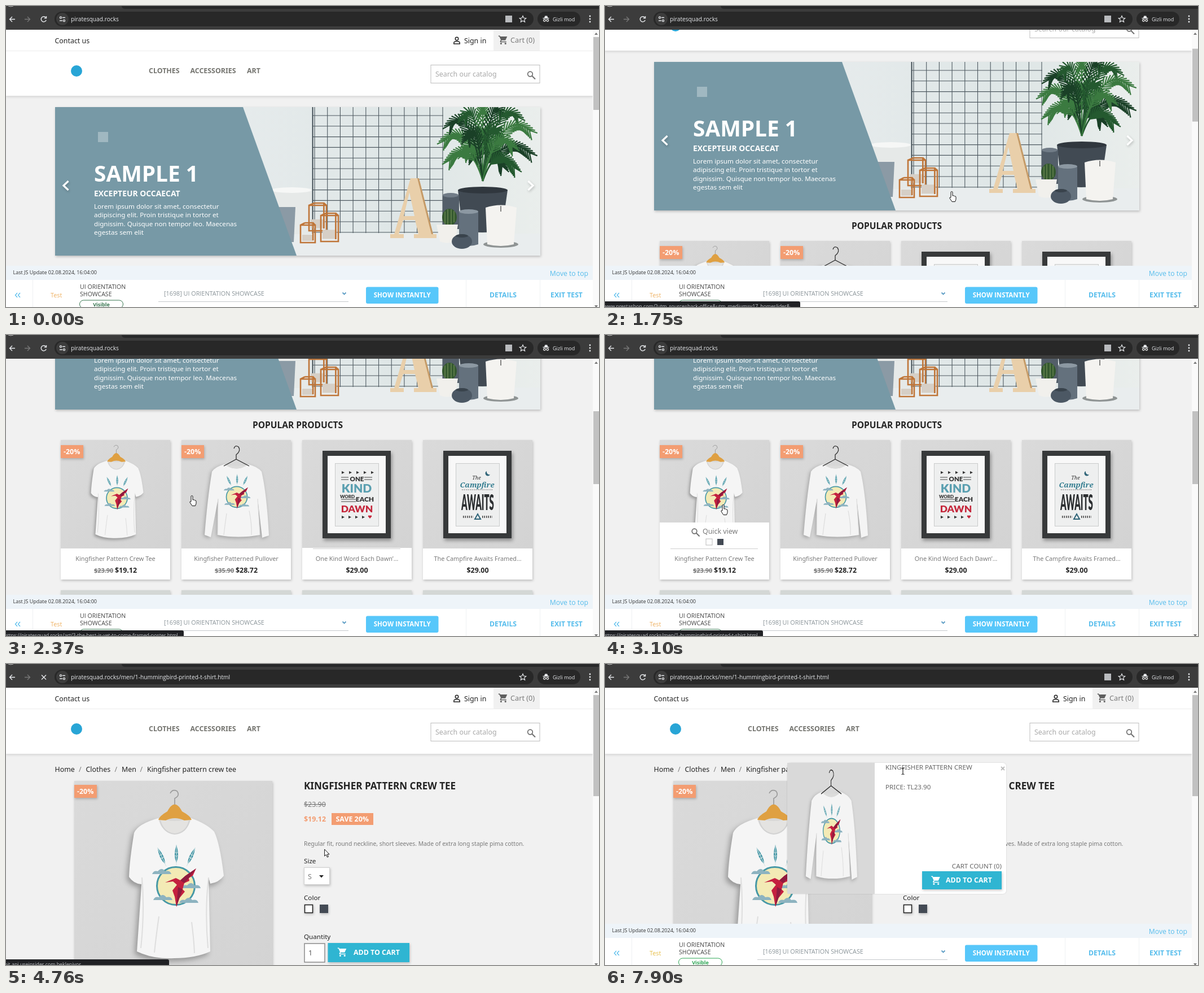
Animation of 1051 by 533 pixels, one loop 8 s. Source, as an HTML page:

```html
<!DOCTYPE html>
<html>
<head>
<meta charset="utf-8">
<style>
html, body { margin: 0; width: 100%; height: 100%; overflow: hidden; background: #f1f1f1 }
svg { display: block; width: 1051px; height: 533px; font-family: "Noto Sans", sans-serif; white-space: pre }
.card { filter: drop-shadow(1px 2px 2px rgba(0,0,0,.22)) }
.open { font-family: "Open Sans", sans-serif }
.arial { font-family: "Liberation Sans", Arial, sans-serif }
</style>
</head>
<body>
<svg id="stage" viewBox="0 0 1051 533"></svg>
<script>
const LOOP = 8000, STEP = 70, BASE = 12.4, SMALL = 11.64, TINY = 10.87;
const BLUE = '#57bdec', ORANGE = '#f39d72', GRAY = '#7a7a7a', INK = '#232323', CYAN = '#2fb5d2';

const T = (x, y, s, size = BASE, fill = INK, more = '') =>
  `<text x="${x}" y="${y}" font-size="${size}" fill="${fill}" ${more}>${s}</text>`;
const R = (x, y, w, h, fill, more = '') =>
  `<rect x="${x}" y="${y}" width="${w}" height="${h}" fill="${fill}" ${more}/>`;
const C = (x, y, r, fill, more = '') => `<circle cx="${x}" cy="${y}" r="${r}" fill="${fill}" ${more}/>`;
const E = (x, y, rx, ry, fill) => `<ellipse cx="${x}" cy="${y}" rx="${rx}" ry="${ry}" fill="${fill}"/>`;
const P = (d, fill, more = '') => `<path d="${d}" fill="${fill}" ${more}/>`;
const L = (d, stroke, w = 1, more = '') => P(d, 'none', `stroke="${stroke}" stroke-width="${w}" ${more}`);
const G = (content, more) => `<g ${more}>${content}</g>`;
const at = (x, y, sx = 1, sy = sx) => `transform="translate(${x} ${y}) scale(${sx} ${sy})"`;
const BOLD = 'font-weight="700"', MID = 'text-anchor="middle"', STRIKE = 'text-decoration="line-through"';
const times = (n, f) => Array.from({ length: n }, (_, i) => f(i)).join('');

const cart = (x, y, fill) => G(
  P('M1 2h3.2l1 2H21l-4 8.5H8.2L7 15h12v2H5.5L4.5 15l2-3.5L3 4H1z', fill) + C(7, 20, 2, fill) + C(17, 20, 2, fill), at(x, y, .776));
const lens = (x, y, c) => C(x, y, 4.3, 'none', `stroke="${c}" stroke-width="1.7"`) + L(`M${x + 3} ${y + 3}l6 6`, c, 2);

function browser() {
  const white = '#e8eaed';
  return R(0, 0, 1051, 42, '#3c3c3c') + P('M205 0H1051V5H212Q205 5 205 0Z', '#272829') + L('M4 0q4 2 9 0', '#c8c8c8')
    + L('M16 23.500H7m4-4.500-4.500 4.500 4.500 4.500', white, 1.4) + L('M33 23.500h9m-4-4.500 4.500 4.500-4.500 4.500', '#777', 1.4)
    + G(L('M70.500 20.500a4.600 4.600 0 1 0 .7 4.500M71.500 18v3.600h-3.600', white, 1.4), 'id="reload"')
    + G(L('M63 19.500l8 8m0-8-8 8', white, 1.4), 'id="stop"')
    + R(86, 10, 849, 26, '#282828', 'rx="13"') + C(100, 23, 11, '#3c3c3c')
    + L('M100 20.500h5M95 26h5', white, 1.4) + C(97, 20.5, 1.6, 'none', `stroke="${white}" stroke-width="1.2"`)
    + C(103, 26, 1.6, 'none', `stroke="${white}" stroke-width="1.2"`)
    + T(115, 27, '', 10.2, white, 'id="url" class="open"')
    + R(885, 17, 12, 12, '#b9bbbe', 'id="translate"')
    + L('M916 17.500l1.700 3.800 4 .4-3 2.700.9 4-3.600-2.100-3.600 2.100.9-4-3-2.700 4-.4z', white, 1.2)
    + R(942, 10, 76, 26, '#282828', 'rx="13"') + P('M954 21l1.200-3.500h4L960.500 21h2v1.200h-11V21z', white)
    + C(954.4, 25.5, 1.9, 'none', 'stroke="#fff" stroke-width="1.1"') + C(959.8, 25.5, 1.9, 'none', 'stroke="#fff" stroke-width="1.1"')
    + T(969, 26.5, 'Gizli mod', 9, white, 'class="open"')
    + [18, 23, 28].map(y => C(1035, y, 1.4, white)).join('');
}

function header() {
  return R(0, 42, 1040, 117, '#fff', 'style="filter:drop-shadow(0 2px 2px rgba(0,0,0,.12))"') + R(0, 79, 1040, 1, '#ececec')
    + T(86.5, 66, 'Contact us') + T(812, 66, 'Sign in') + R(864, 42, 82, 37, '#f1f1f1')
    + C(799, 58, 2.7, 'none', `stroke="${INK}" stroke-width="1.5"`) + L('M793.800 67v-1.500q0-3 5.200-3t5.200 3V67z', INK, 1.5)
    + cart(872, 51, '#5f5f5f') + T(894, 65, 'Cart (0)', 12.7, GRAY)
    + C(125, 115, 10, '#28a5d6')
    + [[253, 'CLOTHES'], [326.5, 'ACCESSORIES'], [427, 'ART']].map(([x, s]) => T(x, 118.5, s, BASE, '#74746f', BOLD)).join('')
    + R(753, 104.5, 193, 32, '#fff', 'stroke="#bdbdbd"') + T(761, 125, 'Search our catalog', BASE, '#a9a9a9') + lens(929, 120.5, '#6f6f6f');
}

// Palm fronds arch out of the pot and droop, with thin leaflets on both sides of the stem.
function frond([x, y], i) {
  const bx = 845, by = 310, cx = bx + (x - bx) * .4, cy = y - 45;
  let d = `M${bx} ${by}Q${cx} ${cy} ${x} ${y}`;
  for (let t = .3; t <= 1; t += .045) {
    const u = 1 - t, px = u * u * bx + 2 * u * t * cx + t * t * x, py = u * u * by + 2 * u * t * cy + t * t * y;
    const dir = Math.atan2(u * (cy - by) + t * (y - cy), u * (cx - bx) + t * (x - cx)), len = 26 - 12 * t;
    for (const s of [-.6, .6])
      d += `M${px.toFixed(1)} ${py.toFixed(1)}l${(len * Math.cos(dir + s)).toFixed(1)} ${(len * Math.sin(dir + s) + 4).toFixed(1)}`;
  }
  return L(d, ['#1a4027', '#24592f', '#3b7a40'][i % 3], 2.2);
}

function lantern(x, y, w, h) {
  return R(x + 3, y + h * .55, w - 6, h * .35, '#d6cfc6')
    + L(`M${x} ${y}h${w}v${h}h${-w}zM${x + w * .3} ${y - 4}h${w * .55}v${h}M${x} ${y}l${w * .3}-4M${x + w} ${y}l-${w * .15}-4`, '#bf7538', 2.6);
}

function banner() {
  const tips = [[830, 270], [868, 262], [812, 262], [880, 285], [845, 235], [776, 240], [786, 212], [812, 198], [845, 188], [878, 192], [908, 198],
    [930, 222], [930, 262], [902, 288], [785, 275], [818, 235], [872, 230], [898, 250]];
  const photo = R(400, 179, 547, 263, 'url(#wall)') + R(400, 403, 547, 39, '#e9edee')
    + L(times(11, i => `M${547 + i * 22.700} 179V402`) + times(12, i => `M543 ${194 + i * 18.800}H775`), '#4e5960', 1.1)
    + L('M543.500 179V403', '#36424a', 1.8)
    + P('M470 326h72l-7 78h-40z', '#e6e9e8') + P('M483 356h30l-3 62h-15z', '#8b9aa5') + E(506, 326, 36, 5, '#f6f7f6')
    + lantern(537, 353, 31, 45) + lantern(522, 388, 26, 31) + lantern(558, 371, 31, 46)
    + P('M717 305h15l25 99h6v7h-40v-7h8l-6-25h-21l-8 25h9v7h-24v-7h7zM715 330l-10 42h19z', '#e9cfaa', 'fill-rule="evenodd"')
    + P('M729 305h3l25 99h-3z', '#c49a67')
    + P('M801 326h88l-10 70q-35 10-70 0z', '#414a53') + E(845, 326, 44, 6, '#30373e')
    + tips.map(frond).join('')
    + P('M774 335q15-7 29 0v60h-29z', '#535e69') + E(788, 335, 14, 4, '#717c87')
    + E(786, 374, 13, 15, '#35592f') + L('M778 364v22m5-26v28m6-28v28m5-25v20', '#7f9a61', 1)
    + P('M763 387h38l-5 30q-14 5-27 0z', '#f1f0ec')
    + P('M803 364q17-7 34 0v58q-17 6-34 0z', '#64717d') + E(820, 364, 17, 4, '#8c98a2')
    + E(808, 417, 18, 13, '#4c5864') + E(808, 407, 11, 3, '#39434c')
    + E(877, 422, 31, 6, '#8f9494') + P('M850 357q27-9 55 0l-5 65q-23 6-47 0z', '#f4f3f0') + L('M877 364v-10', '#555', 1.4);
  return G(R(87, 179, 860, 263, '#ddd'), 'class="card"') + G(photo, 'clip-path="url(#hero)"')
    + P('M87 179H420L515 442H87Z', '#7799a6') + R(163, 223, 18, 18, '#a0b8c1')
    + T(156, 311, 'SAMPLE 1', 38.8, '#fff', BOLD) + T(156, 337, 'EXCEPTEUR OCCAECAT', 13.9, '#fff', BOLD)
    + ['Lorem ipsum dolor sit amet, consectetur', 'adipiscing elit. Proin tristique in tortor et', 'dignissim. Quisque non tempor leo. Maecenas', 'egestas sem elit']
      .map((s, i) => T(156, 358.5 + i * 15.5, s, SMALL, '#fff')).join('')
    + L('M110.500 310l-8.500 8 8.500 8M925.500 310l8.500 8-8.500 8', '#fff', 3.2, 'class="card"');
}

const feather = a => G(P('M0 18Q-6 5 0-14Q6 5 0 18z', '#3f93a3') + L('M-4-2l4 3 4-3M-4 4l4 3 4-3M0-14V22', '#d4e5e6', 1),
  `transform="translate(${181 + a * 1.1} ${127 + Math.abs(a) * .16}) rotate(${a})"`);
const cloud = (x, y) => P(`M${x - 17} ${y}q3-7 10-5q7-8 13 0q9-2 11 5z`, '#8db3c0');
const shirtPrint = [-25, 0, 25].map(feather).join('') + C(180, 186, 33.5, '#f3eab5', 'stroke="#4698a6" stroke-width="3"')
  + cloud(155, 165) + cloud(207, 190) + cloud(157, 211) + cloud(203, 216)
  + P('M161 180L175 174L180 172L188 176L197 168L216 155L210 168L203 172L204 177L195 181L192 192L196 196L186 208L181 223L178 205L174 194L182 184L175 178Z', '#c4203f')
  + P('M197 168l19-13-12 16-9 10-7-5zM184 188l8 4-11 31z', '#8f1b3f');

function defs() {
  const tee = P('M149 66Q113 76 106 92Q98 140 97 170Q105 182 119 183L120 171L111 302Q140 316 177 314Q215 314 241 302L238 171L241 182Q256 180 265 168Q258 110 248 90Q235 76 207 66Q200 92 178 94Q155 92 149 66Z',
    '#f5f5f5', 'style="filter:drop-shadow(-4px 5px 5px rgba(0,0,0,.3))"')
    + P('M149 66Q178 76 207 66Q200 92 178 94Q155 92 149 66Z', '#e4e3e1')
    + P('M149 69Q151 62 165 54Q178 29 191 54Q206 62 208 69L195 70Q178 62 162 70Z', '#dfa042')
    + L('M178 42V31Q188 26 182 18Q174 14 170 22', '#999', 1.6) + L('M152 70Q158 92 178 94Q199 92 204 70', '#d2d2d2', 2)
    + L('M120 171q5 60-2 125M238 171q-7 60-1 125M150 240q-5 35-8 64M208 250q4 30 5 55', '#dedede', 2) + `<use href="#print"/>`;
  const sweater = P('M76 43Q60 47 54 56Q46 104 41 168L52 172L65 104L64 168Q100 175 139 168L135 104L143 173L155 169Q151 94 142 56Q135 47 118 43Q98 58 76 43Z',
    '#f4f4f4', 'style="filter:drop-shadow(-2px 2px 3px rgba(0,0,0,.25))"')
    + P('M76 43Q98 48 118 43Q98 58 76 43Z', '#dcdcdb') + L('M65 104l-1 64m71-64 4 64M80 130q-3 20-5 38M120 125q5 25 4 43', '#dcdcdc', 1.2)
    + L('M75 46L97 34L120 46M97 34V26Q106 19 101 12Q95 8 93 15', '#2b2b2b', 1.3) + G(`<use href="#print"/>`, at(-1.5, -2, .553));
  return `<defs><linearGradient id="wall"><stop stop-color="#e6ebec"/><stop offset=".6" stop-color="#dee6e6"/><stop offset="1" stop-color="#eaeeec"/></linearGradient>
    <linearGradient id="studio" x2="1" y2="1"><stop stop-color="#dadada"/><stop offset="1" stop-color="#d3d3d3"/></linearGradient>
    <clipPath id="hero"><rect x="87" y="179" width="860" height="263"/></clipPath>
    <clipPath id="view"><rect y="42" width="1040" height="491"/></clipPath>
    <clipPath id="shot"><rect width="194" height="192"/></clipPath>
    <g id="print">${shirtPrint}</g><g id="tee">${tee}</g><g id="sweater">${sweater}</g></defs>`;
}

const frame = R(36, 19, 121, 155, '#37393a', 'style="filter:drop-shadow(2px 4px 3px rgba(0,0,0,.35))"') + R(45, 28, 103, 137, '#f8f8f8')
  + R(58.5, 41.5, 77, 111, '#eeefef', 'stroke="#c9cbcb"');
const lato = 'text-anchor="middle" font-weight="900" font-family="Lato, sans-serif"';
const poster1 = frame + times(5, i => P(`M${70 + i * 13} 55l5 2.500-5 2.500z`, '#333') + (i < 4 ? P(`M${70 + i * 12} 134l5 2.500-5 2.500z`, '#333') : ''))
  + L('M69 66h13m-13 4h13m28-4h14m-14 4h14M69 105h26m-26 4h26', '#444', 1.2) + T(97, 73, 'ONE', 11.5, '#333', lato)
  + T(96.5, 93, 'KIND', 21, '#5a9fb0', lato) + T(80, 103, 'WORD', 8, '#333', lato) + T(111, 109, 'EACH', 12, '#333', lato)
  + T(97, 128, 'DAWN', 17.5, '#c5283c', lato) + P('M120 139l-3.500-4q1.500-3 3.500-.7q2-2.300 3.500.7z', '#c5283c');
const poster2 = frame + P('M113 55a4.500 4.500 0 1 0 6 6a5 5 0 0 1-6-6z', '#2f6478')
  + T(95, 70, 'The', 9, '#333', 'text-anchor="middle" font-style="italic" font-family="Noto Serif, serif"')
  + T(96, 84, 'Campfire', 13, '#347d90', 'text-anchor="middle" font-style="italic" font-weight="700" font-family="Noto Serif, serif"')
  + L('M69 88h56', '#444', 1.2, 'stroke-dasharray="1.500 2"') + G(T(0, 0, 'AWAITS', 15, '#2c2f31', lato), at(97, 124, 1, 2.5))
  + L('M92 140l5-9 5 9z', '#2f6478', 2) + L('M71 136h18m16 0h18', '#444', 4, 'stroke-dasharray="1.500 2"');

const cards = [
  { art: G('<use href="#tee"/>', at(0, 0, .553)), name: 'Kingfisher Pattern Crew Tee', price: '$19.12', old: '$23.90' },
  { art: '<use href="#sweater"/>', name: 'Kingfisher Patterned Pullover', price: '$28.72', old: '$35.90' },
  { art: poster1, name: 'One Kind Word Each Dawn’…', price: '$29.00' },
  { art: poster2, name: 'The Campfire Awaits Framed…', price: '$29.00' }];

const badge = (x, y) => R(x, y, 40, 23, ORANGE, 'class="card"') + T(x + 5, y + 16, '-20%', BASE, '#fff', BOLD);

function card({ art, name, price, old }, i) {
  const lift = R(0, 0, 194, 60, '#fff') + lens(61.5, 15.5, '#6f6f6f') + T(76, 20, 'Quick view', BASE, GRAY)
    + (i ? '' : R(82, 29, 11, 11, '#fff', 'stroke="#bbb"') + R(102, 29, 11, 11, '#434a54'));
  return G(G(R(0, 0, 194, 247, '#fff'), 'class="card"') + R(0, 0, 194, 192, 'url(#studio)')
    + G(art + G(lift, `id="lift${i}"`), 'clip-path="url(#shot)"')
    + R(0, 192, 194, 55, '#fff') + R(19, 192, 155, 1, '#cfcfcf', `id="rule${i}"`)
    + (old ? badge(0, 9) : '') + T(97, 214, name, TINY, GRAY, MID)
    + (old ? T(59, 235, old, TINY, GRAY, BOLD + STRIKE) + T(96, 235, price, BASE, INK, BOLD) : T(97, 235, price, BASE, INK, MID + BOLD)), at(97 + i * 214, 496))
    + R(97 + i * 214, 762, 194, 60, '#d3d7d5', 'class="card"');
}

const home = () => header() + banner() + T(517, 474.5, 'POPULAR PRODUCTS', 15.5, INK, MID + BOLD) + cards.map(card).join('');

function product() {
  const crumbs = [[86.5, 'Home'], [129, '/'], [141.5, 'Clothes'], [192.5, '/'], [205, 'Men'], [237.5, '/'], [250, 'Kingfisher pattern crew tee']];
  return R(0, 42, 1040, 491, '#f1f1f1') + header() + crumbs.map(([x, s]) => T(x, 191, s, BASE, s === '/' ? GRAY : INK)).join('')
    + R(121, 207, 351, 351, 'url(#studio)', 'class="card"') + G('<use href="#tee"/>', at(121, 207)) + badge(121, 214)
    + T(528, 222, 'KINGFISHER PATTERN CREW TEE', 17.07, INK, BOLD) + T(528, 253, '$23.90', BASE, GRAY, STRIKE)
    + T(528, 278.5, '$19.12', BASE, ORANGE, BOLD) + R(577, 264, 74, 21, ORANGE) + T(584.5, 279, 'SAVE 20%', BASE, '#fff', BOLD)
    + T(528, 321.5, 'Regular fit, round neckline, short sleeves. Made of extra long staple pima cotton.', 10.35, GRAY)
    + T(528, 353, 'Size', SMALL) + R(528.5, 360.5, 45, 30, '#fff', 'stroke="#d0d0d0" class="card"') + T(535, 381, 'S', BASE, GRAY)
    + P('M555 374h8l-4 4.500z', INK) + T(528, 418, 'Color', SMALL)
    + R(529.5, 426.5, 14, 14, '#fff', 'stroke="#222" stroke-width="1.600" class="card"') + R(556, 426, 15, 15, '#434a54', 'class="card"')
    + T(528, 487, 'Quantity', SMALL) + R(529, 495, 36, 33, '#fff', 'stroke="#8b8b8b" stroke-width="1.500"') + T(536, 516, '1', BASE, '#555')
    + R(570.5, 494, 144.5, 34, CYAN, 'class="card"') + cart(587, 501, '#fff') + T(616, 515, 'ADD TO CART', BASE, '#fff', BOLD);
}

const popup = () => R(323, 175, 388, 232, '#fff', 'rx="6" style="filter:drop-shadow(0 0 1px rgba(0,0,0,.15))"')
  + R(323, 175, 155, 232, '#d9d9d9') + G('<use href="#sweater"/>', at(323, 175, .8, 1.196))
  + T(497, 187, 'KINGFISHER PATTERN CREW', SMALL, '#666') + T(497, 222, 'PRICE: TL23.90', SMALL, '#666')
  + T(703, 361.5, 'CART COUNT (0)', SMALL, '#666', 'text-anchor="end"') + L('M702 182l6 6m0-6-6 6', '#bbb', 1.8)
  + R(562, 367, 141, 32, CYAN, 'class="card"') + cart(577.5, 374, '#fff') + T(604, 386.5, 'ADD TO CART', BASE, '#fff', BOLD);

const chevron = (x, y) => L(`M${x - 3} ${y - 1.5}l3 3 3-3`, '#5b9cc4', 1.8);
const toolbar = buttonX => R(0, 460, 1040, 25, '#eef4f9') + R(0, 485, 1040, 48, '#fff')
  + [47, 815, 946].map(x => R(x, 485, 1, 48, '#eef1f3')).join('') + R(buttonX, 497.5, 128.5, 29.5, '#57c7fa', 'rx="3"')
  + T(buttonX + 64.2, 516, 'SHOW INSTANTLY', 11.5, '#fff', MID + BOLD) + T(881, 516, 'DETAILS', 12.2, BLUE, MID + BOLD)
  + T(993.5, 516, 'EXIT TEST', 12.2, BLUE, MID + BOLD) + T(1032, 477.5, 'Move to top', 12.2, BLUE, 'text-anchor="end"');
const fullBar = () => toolbar(638) + T(12.5, 475, 'Last JS Update 02.08.2024, 16:04:00', 9, '#333')
  + L('M20 508l-3.500 4 3.500 4m5-8-3.500 4 3.500 4', BLUE, 1.3) + T(79, 516, 'Test', 10.8, '#eeb060', 'id="test"')
  + T(131, 500.5, 'UI ORIENTATION', 10.6, '#444') + T(131, 514, 'SHOWCASE', 10.6, '#444')
  + G(R(130.5, 521, 77, 14, '#fff', 'rx="7" stroke="currentColor"') + T(169, 531.5, 'Visible', 9, 'currentColor', MID + BOLD), 'id="pill"')
  + T(280, 513, '[1698] UI ORIENTATION SHOWCASE', 10.8, '#8a9499') + R(270, 523, 337, 1, '#c5c9cc') + chevron(599.5, 509);
const emptyBar = () => toolbar(482.5) + T(12, 475, 'Last JS Update', 9, '#333')
  + R(110.5, 507.5, 77, 12, '#fff', 'rx="6" stroke="#ee5c55"') + T(149, 517, 'Not Visible', 9, '#ee4c45', MID + BOLD)
  + R(422, 522, 30, 1, '#c5c9cc') + chevron(445, 509);

const outlined = 'stroke="#111" stroke-linejoin="round"';
const stage = document.getElementById('stage');
stage.innerHTML = defs() + R(0, 0, 1051, 533, '#f1f1f1')
  + G(G(home(), 'id="home"') + G(product(), 'id="product"') + G(popup(), 'id="popup"'), 'clip-path="url(#view)"')
  + G(fullBar(), 'id="fullBar" class="open"') + G(emptyBar(), 'id="emptyBar" class="arial"')
  + R(1040, 42, 11, 491, '#fafafa') + P('M1043 51l3-4 3 4zM1043 530l3 4 3-4z', '#777') + R(1041, 55, 10, 129, '#c1c1c1', 'id="thumb"')
  + P('', '#202124', 'id="statusBox"') + T(-3, 535, '', 8.8, '#c5c8cc', 'id="status" class="open"') + browser()
  + G(G(P('M3 9V2q0-1.500 1.500-1.500T6 2v6q3-.8 3.500.8 2.500-.3 2.500 1.500v4l-1.500 4.200H5L1 12.500Q0 10.500 3 11z', '#fff', outlined), 'id="hand"')
    + G(P('M.5.5v12l2.800-2.500 2 4.500 2-.9-2-4.300h3.700z', '#fff', outlined), 'id="arrow"')
    + G(L('M-2.500-5.500q2 0 2.500 1 .5-1 2.500-1M0-4.500v9M-2.500 5.500q2 0 2.500-1 .5 1 2.500 1', '#222', 1.2), 'id="beam"'), 'id="cursor"');

const el = {};
stage.querySelectorAll('[id]').forEach(e => el[e.id] = e);
const show = (id, on) => el[id].style.display = on ? '' : 'none';
const move = (id, x, y) => el[id].setAttribute('transform', `translate(${x} ${y})`);
const between = (t, a, b) => t >= a && t < b;

// Linear value from keys [time, ...values], held before the first and after the last.
function track(keys, t) {
  const n = keys.findIndex(k => k[0] > t);
  if (n === 0) return keys[0].slice(1);
  if (n < 0) return keys[keys.length - 1].slice(1);
  const a = keys[n - 1], b = keys[n], u = (t - a[0]) / (b[0] - a[0]);
  return a.slice(1).map((v, i) => v + (b[i + 1] - v) * u);
}

const scrollKeys = [[1640, 0], [1750, 80], [1890, 190], [2050, 285], [2200, 310]];
const cursorKeys = [[150, 768, 418], [550, 610, 328], [1750, 610, 328], [2100, 580, 318], [2310, 325, 284], [2510, 300, 285], [2850, 205, 300],
  [3340, 205, 300], [3780, 554, 300], [4370, 554, 300], [4740, 564, 327], [5190, 566, 341], [5380, 572, 352],
  [6350, 572, 352], [6530, 494, 310], [6900, 440, 285], [7350, 429, 243], [7550, 429, 243], [7840, 528, 190]];
const liftKeys = [
  [[2680, 0], [2900, 46], [3600, 46], [3780, 17]],
  [[2430, 0], [2580, 24], [2680, 24], [2850, 0], [3600, 0], [3780, 24]],
  [[2240, 0], [2310, 1], [2380, 1], [2430, 0]]];
const site = 'piratesquad.rocks', teePath = '/men/1-hummingbird-printed-t-shirt.html';
const statuses = [
  [740, 346, 'www.prestashop.com/?utm_source=back-office&utm_medium=v17_homeslider&…'],
  [2290, 315, `https://${site}/art/3-the-best-is-yet-to-come-framed-poster.html`],
  [2440, 300, `https://${site}/women/2-hummingbird-printed-sweater.html`],
  [2700, 280, `https://${site}${teePath}`],
  [3340, 289, 'hit.api.useinsider.com bekleniyor…'],
  [5250, 0, '']];

function draw(t) {
  const step = t - t % STEP;
  const [scroll] = track(scrollKeys, step), onProduct = t >= 4120, loading = between(t, 3280, 5190);
  show('home', !onProduct);
  show('product', onProduct);
  move('home', 0, -scroll);
  el.thumb.setAttribute('y', onProduct ? 55 : 55 + scroll * .258);
  el.thumb.setAttribute('height', onProduct ? 179 : 129);

  liftKeys.forEach((keys, i) => move('lift' + i, 0, 192 - track(keys, step)[0]));
  move('lift3', 0, 192);
  show('rule0', between(t, 2680, 3600));
  show('rule1', between(t, 2430, 2680) || t >= 3600);
  show('rule2', between(t, 2290, 2430));
  show('rule3', false);

  show('popup', t >= 5980);
  show('fullBar', !onProduct || t >= 6460);
  show('emptyBar', between(t, 5780, 6460));
  el.pill.style.color = onProduct ? '#2ba552' : '#36754f';
  el.test.setAttribute('fill', onProduct ? '#e6bd45' : '#eeb060');

  el.url.textContent = site + (t >= 3340 ? teePath : '');
  show('stop', loading);
  show('reload', !loading);
  show('translate', !between(t, 3340, 5120));

  const [, width, label] = statuses.filter(s => s[0] <= t).pop() || [0, 0, ''];
  el.status.textContent = label;
  el.statusBox.setAttribute('d', width ? `M0 523H${width - 3}q3 0 3 3V533H0z` : '');

  show('cursor', t >= 70);
  move('cursor', ...track(cursorKeys, step));
  show('hand', t < 3400);
  show('arrow', between(t, 3400, 7800));
  show('beam', t >= 7800);
}

const start = performance.now();
(function tick() {
  draw((performance.now() - start) % LOOP);
  requestAnimationFrame(tick);
})();
</script>
</body>
</html>
```
